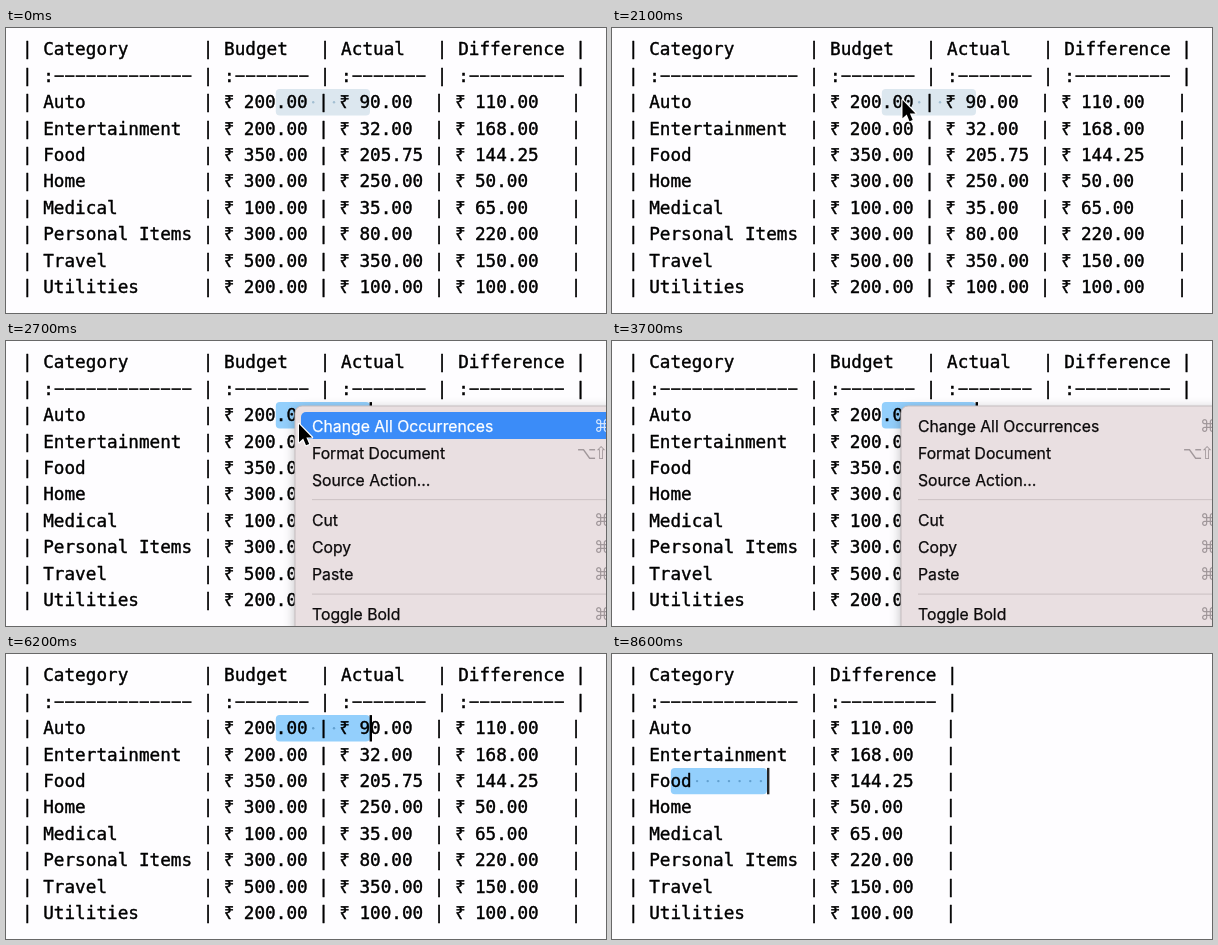
An HTML page with a canvas for the animation above (8700 ms loop, 600x285 px).

```html
<!DOCTYPE html>
<html lang="en">
<head>
<meta charset="utf-8">
<title>Table column removal</title>
<style>
  html, body { margin: 0; width: 100%; height: 100%; overflow: hidden; background: #fefdff; }
  canvas { display: block; width: 600px; height: 285px; }
</style>
</head>
<body>
<canvas id="stage" width="600" height="285"></canvas>
<script>
const ctx = document.getElementById('stage').getContext('2d');
const LOOP = 8700;
const CHAR = 10.64, LEFT = 15.9, LINE = 26.4, TOP = 8.3;
const RUPEE_NARROWING = 1.5;
const MONO = `${CHAR / 0.60205}px "DejaVu Sans Mono", monospace`;
const RUPEE = '18px "Noto Sans", sans-serif';
const UI = '15.75px Inter, sans-serif';
const SYMBOLS = '17px "DejaVu Sans", sans-serif';

// Timeline in ms
const FOCUS = 2300, MENU_FADE = 5850, MENU_GONE = 6150, TABLE_CUT = 6290, CARET_RESET = 6680;

const widths = [14, 8, 8, 10];
const money = n => '₹ ' + n.toFixed(2);
const rows = [
  ['Category', 'Budget', 'Actual', 'Difference'],
  widths.map(w => ':' + '-'.repeat(w - 1)),
  ...[
    ['Auto', 200, 90], ['Entertainment', 200, 32], ['Food', 350, 205.75],
    ['Home', 300, 250], ['Medical', 100, 35], ['Personal Items', 300, 80],
    ['Travel', 500, 350], ['Utilities', 200, 100]
  ].map(([name, budget, actual]) => [name, money(budget), money(actual), money(budget - actual)])
];
const tableLines = columns => rows.map(row =>
  '| ' + columns.map(c => row[c].padEnd(widths[c])).join(' | ') + ' |');
const fullTable = tableLines([0, 1, 2, 3]);
const shortTable = tableLines([0, 3]);

const menuItems = [
  ['Change All Occurrences', 85, '⌘'], ['Format Document', 112, '⌥⇧'], ['Source Action…', 139, ''],
  ['Cut', 179, '⌘'], ['Copy', 206, '⌘'], ['Paste', 233, '⌘'], ['Toggle Bold', 273, '⌘']
];

const clamp = v => Math.max(0, Math.min(1, v));
const smooth = v => { v = clamp(v); return v * v * (3 - 2 * v); };

function roundBox(x, y, w, h, r, color) {
  ctx.fillStyle = color;
  ctx.beginPath();
  ctx.roundRect(x, y, w, h, r);
  ctx.fill();
}

function drawLine(text, row) {
  const baseline = TOP + row * LINE + 19;
  let x = LEFT;
  for (const ch of text) {
    const rupee = ch === '₹';
    if (ch === '-') {
      // Wide hyphens that almost touch
      ctx.fillRect(x + 0.6, baseline - 6.4, CHAR - 1.2, 1.6);
    } else if (ch !== ' ') {
      ctx.font = rupee ? RUPEE : MONO;
      ctx.fillText(ch, x, baseline);
      ctx.strokeText(ch, x, baseline);
    }
    x += rupee ? CHAR - RUPEE_NARROWING : CHAR;
  }
}

function drawSelection(x1, x2, row, dots, active) {
  const y = TOP + row * LINE;
  roundBox(x1, y, x2 - x1, LINE, 4, active ? '#93cffc' : '#dce7ef');
  ctx.fillStyle = active ? '#62a0cf' : '#a3bfd2';
  for (const x of dots) {
    ctx.beginPath();
    ctx.arc(x, y + LINE / 2, 1.2, 0, 7);
    ctx.fill();
  }
}

function caretOpacity(t) {
  if (t < FOCUS) return 0;
  const resumed = t >= MENU_GONE && t < CARET_RESET;
  if (resumed && t > MENU_GONE + 300) return 0;
  const phase = (t - (resumed ? MENU_GONE : 750)) % 1000;
  const half = phase < 500 ? phase : 1000 - phase;
  return 1 - smooth((half - 100) / 200);
}

function drawCaret(x, row, opacity) {
  ctx.globalAlpha = opacity;
  ctx.fillStyle = '#000';
  ctx.fillRect(x, TOP + row * LINE, 2.4, LINE);
  ctx.globalAlpha = 1;
}

function drawMenu(t) {
  ctx.save();
  ctx.globalAlpha = 1 - clamp((t - MENU_FADE) / (MENU_GONE - MENU_FADE)) ** 4;
  ctx.shadowColor = 'rgba(0,0,0,.28)';
  ctx.shadowBlur = 12;
  ctx.shadowOffsetY = 3;
  roundBox(289, 65, 360, 300, 7, '#e9dfe1');
  ctx.shadowColor = 'transparent';
  ctx.strokeStyle = '#c5bdbf';
  ctx.lineWidth = 1;
  ctx.stroke();

  const highlighted = t > 2450 && t < 3170;
  if (highlighted) roundBox(295, 71, 340, 27, 5, '#3b8cf8');
  ctx.fillStyle = '#cfc5c7';
  for (const y of [158, 252.5]) ctx.fillRect(306, y, 294, 1.2);

  ctx.lineWidth = 0.25;
  menuItems.forEach(([label, y, keys], i) => {
    const lit = highlighted && i === 0;
    ctx.font = UI;
    ctx.fillStyle = ctx.strokeStyle = lit ? '#fff' : '#0c0a0b';
    ctx.fillText(label, 306, y + 5.7);
    ctx.strokeText(label, 306, y + 5.7);
    ctx.font = SYMBOLS;
    ctx.fillStyle = lit ? '#d5e6fd' : '#a0979a';
    [...keys].forEach((key, k) => ctx.fillText(key, 588 - 17 * (keys.length - 1 - k), y + 6));
  });
  ctx.restore();
}

const pointerStops = [
  [1550, 291, 73], [1850, 291, 73], [2100, 290.5, 72], [2280, 288, 65],
  [2600, 293, 83], [2750, 293, 83], [3200, 615, 83]
];

function pointerPosition(t) {
  if (t < pointerStops[0][0]) {
    const s = clamp((t - 450) / 1100), u = 1 - (1 - s) ** 1.5, v = 1 - u;
    const bezier = (a, b, c) => v * v * a + 2 * u * v * b + u * u * c;
    return [bezier(376, 340, 291), bezier(-24, 312, 73)];
  }
  const next = pointerStops.findIndex(stop => stop[0] > t);
  const [t0, x0, y0] = pointerStops[next - 1], [t1, x1, y1] = pointerStops[next];
  const k = smooth((t - t0) / (t1 - t0));
  return [x0 + (x1 - x0) * k, y0 + (y1 - y0) * k];
}

const arrow = new Path2D('M0 0V18.3L4.2 14.5L7 21.2L10.2 19.9L7.4 13.4H13Z');

function drawPointer(t) {
  ctx.save();
  ctx.translate(...pointerPosition(t));
  ctx.strokeStyle = '#fff';
  ctx.lineWidth = 2.4;
  ctx.lineJoin = 'round';
  ctx.stroke(arrow);
  ctx.fillStyle = '#000';
  ctx.fill(arrow);
  ctx.restore();
}

function draw(t) {
  ctx.fillStyle = '#fefdff';
  ctx.fillRect(0, 0, 600, 285);
  const cut = t >= TABLE_CUT;

  if (cut) {
    const dots = Array.from({ length: 7 }, (_, i) => LEFT + (i + 6.5) * CHAR);
    drawSelection(58.8, 155, 4, dots, true);
  } else {
    drawSelection(269.8, 364, 2, [307.2, 328], t >= FOCUS);
  }

  ctx.fillStyle = ctx.strokeStyle = '#000';
  ctx.lineWidth = 0.4;
  ctx.lineJoin = 'round';
  (cut ? shortTable : fullTable).forEach(drawLine);
  drawCaret(cut ? 155 : 363.6, cut ? 4 : 2, caretOpacity(t));

  if (t >= FOCUS && t < MENU_GONE) drawMenu(t);
  if (t >= 450 && t < 3200) drawPointer(t);
}

const start = performance.now();
function frame() {
  draw((performance.now() - start) % LOOP);
  requestAnimationFrame(frame);
}
frame();
</script>
</body>
</html>
```
